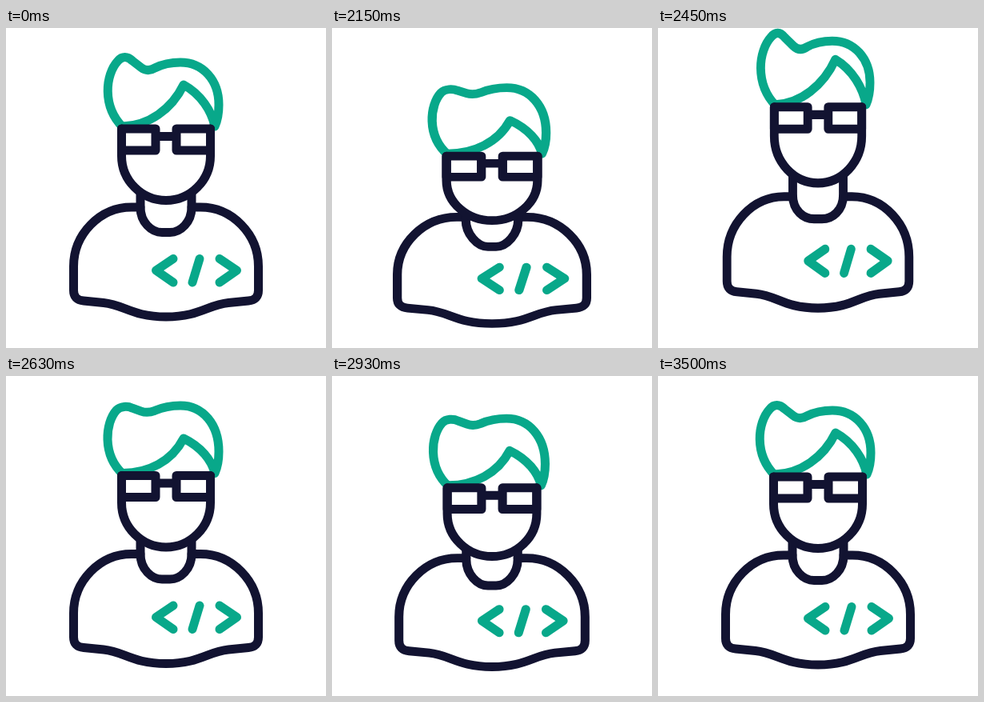
An HTML page with a canvas for the animation above (3530 ms loop, 400 by 400 pixels).

```html
<!DOCTYPE html>
<html lang="en">
<head>
<meta charset="utf-8">
<title>Bouncing coder</title>
<style>
  html, body { margin: 0; width: 100%; height: 100%; overflow: hidden; background: #fff; }
  canvas { display: block; width: 400px; height: 400px; }
</style>
</head>
<body>
<canvas id="stage" width="400" height="400"></canvas>
<script>
const ctx = document.getElementById('stage').getContext('2d');
const DARK = '#121331', GREEN = '#08a88a';
const LOOP = 3530, STEP = 30, FLOOR = 362;

// time, vertical shift, squash, head drop, hair flattening
const KEYS = [
  [2000, 0, 0, 0, 0],
  [2030, 3, 0.2, -0.02, 0],
  [2130, 9.2, 0.9, 0.85, 0.5],
  [2170, 7, 0.7, 0.95, 0.85],
  [2270, -3, 0, 0.46, 0.9],
  [2360, -8.5, -0.3, -0.15, 0.3],
  [2470, -11, -0.5, -0.6, -0.3],
  [2540, -8, -0.4, -0.5, 0],
  [2630, -1.5, 0, 0, 0.65],
  [2780, 9, 1, 1, 1],
  [2880, 5, 0.5, 0.7, 0.85],
  [3000, -0.5, 0, 0.1, 0.2],
  [3080, -2, 0, -0.08, -0.15],
  [3250, 2.8, 0.2, 0, 0.05],
  [3500, 0, 0, 0, 0]
];

// Tangent that stays flat at turning points, so curves never overshoot a key.
function slope(i, c) {
  if (i === 0 || i === KEYS.length - 1) return 0;
  const rate = j => (KEYS[j + 1][c] - KEYS[j][c]) / (KEYS[j + 1][0] - KEYS[j][0]);
  const a = rate(i - 1), b = rate(i);
  return a * b <= 0 ? 0 : 2 * a * b / (a + b);
}

function poseAt(t) {
  const last = KEYS.length - 1;
  if (t <= KEYS[0][0] || t >= KEYS[last][0]) return [0, 0, 0, 0];
  const i = KEYS.findIndex(k => k[0] > t) - 1;
  const from = KEYS[i], to = KEYS[i + 1];
  const span = to[0] - from[0], u = (t - from[0]) / span, v = 1 - u;
  return [1, 2, 3, 4].map(c =>
    from[c] * v * v * (1 + 2 * u) + to[c] * u * u * (3 - 2 * u) +
    span * u * v * (v * slope(i, c) - u * slope(i + 1, c)));
}

function stroke(color, path) {
  ctx.strokeStyle = color;
  ctx.stroke(new Path2D(path));
}

function drawBody(drop) {
  stroke(DARK, `M168 224 H157 C117 224 84.5 258 84.5 298 V328
    Q84.5 340 97 341 L122 343.5 C148 346 158 361 200 361
    C242 361 252 346 278 343.5 L303 341 Q315.5 340 315.5 328
    V298 C315.5 258 283 224 243 224 H232`);
  const top = 208 + 14 * drop, side = 224 + 3 * drop, low = 255.5 + 7 * drop;
  stroke(DARK, `M168 ${top} V${side} C168 ${side + 19} 182 ${low} 195 ${low}
    H205 C218 ${low} 232 ${side + 19} 232 ${side} V${top}`);
  stroke(GREEN, 'M209 288.5 L187.5 303 L209 318 M242 288.5 L233 318 M267 288.5 L288.5 303 L267 318');
}

function drawHair(drop, flat) {
  const y = (base, bend = 0) => base + 21 * drop + bend * flat;
  const tuftX = 140 - 3 * flat;
  stroke(GREEN, `M146 ${y(124)}
    C120 ${y(98, 3)} 124 ${y(58, 3)} ${tuftX} ${y(41, 5)}
    C${tuftX + 5} ${y(35, 6)} 152 ${y(35, 6)} 158 ${y(41, 1)}
    L169 ${y(49.5, -6)} Q177 ${y(55.5, -11)} 186 ${y(50, -8)}
    C196 ${y(45, -7)} 207 ${y(43, -7)} 218 ${y(43, -7)}
    C246 ${y(43, -7)} 266 ${y(65, -5)} 266 ${y(96)}
    Q266 ${y(112)} 261 ${y(123)}
    C257 ${y(104, 4)} 244 ${y(83, 11)} 222 ${y(71, 13)}
    C207 ${y(102, 10)} 178 ${y(122, 1)} 146 ${y(123)} Z`);
}

function drawHead(drop) {
  const top = 126 + 21 * drop, cheek = 160 + 18 * drop, chin = 215.5 + 14 * drop;
  const curve = (chin - cheek) * 0.55;
  stroke(DARK, `M144.5 ${top} V${cheek} C144.5 ${cheek + curve} 169.5 ${chin} 200 ${chin}
    C230.5 ${chin} 255.5 ${cheek + curve} 255.5 ${cheek} V${top}`);
  stroke(DARK, `M144.5 ${top} h42.5 v27 h-42.5 Z M213 ${top} h42.5 v27 h-42.5 Z
    M187 ${top + 9.5} H213`);
}

function draw(t) {
  const [shift, squash, drop, flat] = poseAt(t);
  ctx.setTransform(1, 0, 0, 1, 0, 0);
  ctx.fillStyle = '#fff';
  ctx.fillRect(0, 0, 400, 400);
  ctx.translate(200, FLOOR + shift);
  ctx.scale(1 + 0.03 * squash, 1 - 0.035 * squash);
  ctx.translate(-200, -FLOOR);
  ctx.lineWidth = 11;
  ctx.lineCap = ctx.lineJoin = 'round';
  drawBody(drop);
  drawHair(drop, flat);
  drawHead(drop);
}

const start = performance.now();
function tick() {
  const t = (performance.now() - start) % LOOP;
  draw(Math.floor((t - 20) / STEP) * STEP + 20);
  requestAnimationFrame(tick);
}
tick();
</script>
</body>
</html>
```
